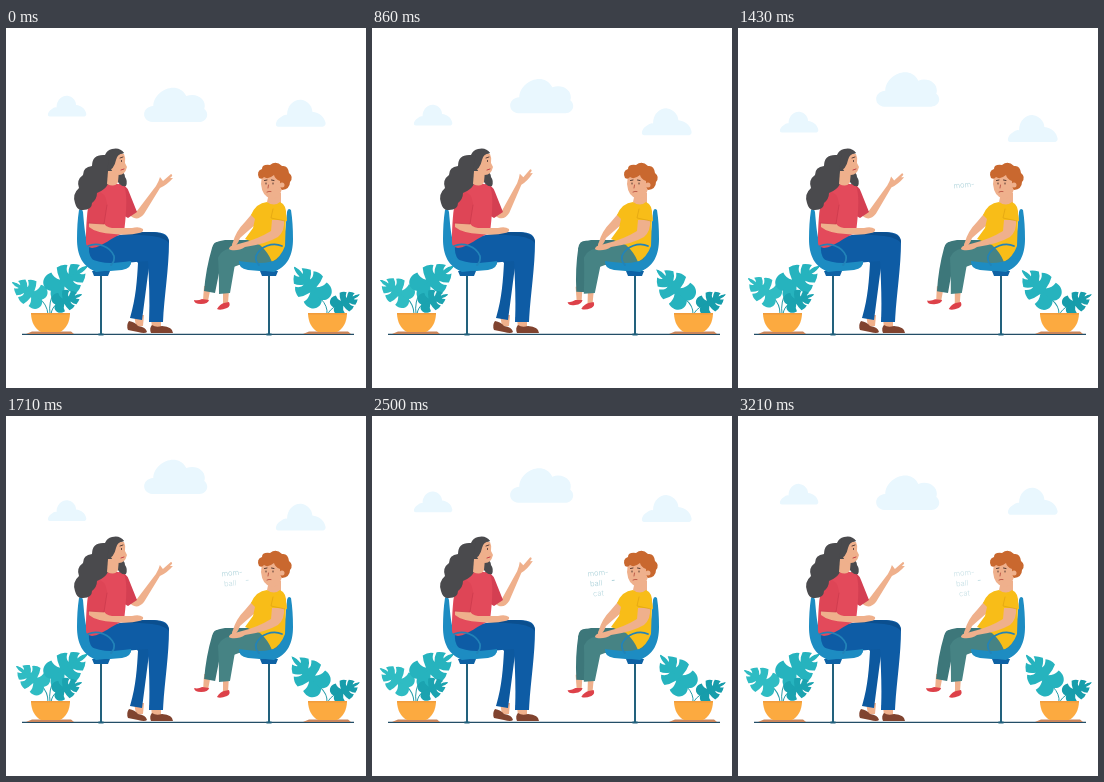
These frames come from a looping animation (360 px wide and 360 px high, 3.28 s). An HTML page:

```html
<!DOCTYPE html>
<html lang="en">
<head>
<meta charset="utf-8">
<style>
html, body { margin: 0; width: 100%; height: 100%; overflow: hidden; background: #fff; }
svg { display: block; width: 100vw; height: 100vh; }
.skin { fill: #efb08c; }
.words { font: 300 7.6px Inter, "Open Sans", sans-serif; fill: #a9d0d8; }
.line { fill: none; stroke-linecap: round; stroke-linejoin: round; }
</style>
</head>
<body>
<svg viewBox="0 0 360 360">
  <defs>
    <path id="cloud" d="M8 35C-3 34-3 20 9 19C9 4 33-8 42 9C53 5 63 13 60 22C66 27 62 35 55 35Z"/>
    <path id="lowCloud" d="M3 35C-2 35-1 27 6 23Q10 19 14 20C14 7 24 0 32 1C40 2 46 9 46 16C55 17 61 23 62 28C64 32 62 35 59 35Z"/>
    <path id="halfLeaf" d="M0 1C-9-5-3-18 9-15Q8-9 12-4Q13-11 16-16Q22-16 26-12Q21-8 22-4Q25-9 29-11Q34-8 36-5Q32-4 31-2Q37-3 42 0L40 1Z"/>
    <g id="leaf">
      <use href="#halfLeaf"/>
      <use href="#halfLeaf" transform="scale(1 -1)"/>
    </g>
    <g id="pot">
      <path fill="#c9855c" d="M26 303.5H65L68 306H20Z"/>
      <path fill="#fcaa40" d="M25 285H64C64 294 60 301 54 304H35C29 301 25 294 25 285Z"/>
      <path fill="#f19c3c" d="M25 285H64V286.5H25Z"/>
    </g>
    <g id="chairBack">
      <path class="line" stroke="#22617d" stroke-width="2" d="M95 245V306M93 306.5H97"/>
      <path fill="#1d8cc2" d="M73 182Q76 179 77 184C79 207 80 218 89 225C101 233 112 233 125 233Q126 240 116 242L92 244C76 240 71 226 71 211Q71 195 73 182Z"/>
    </g>
    <g id="chairFront">
      <path fill="#0e62a4" d="M86 243H104L102 248H88Z"/>
      <path fill="#1d8cc2" d="M83 230C96 237 110 235 125 233Q126 239 115 241L90 244Q82 240 78 231Z"/>
      <path class="line" stroke="#2283b8" stroke-width="1.8" d="M82 218C91 214 104 218 108 228Q109 233 105 237"/>
    </g>
  </defs>

  <g id="clouds" fill="#e9f7fe">
    <use href="#lowCloud"/><use href="#cloud"/><use href="#lowCloud"/>
  </g>
  <path stroke="#234e67" stroke-width="1.3" d="M16 306.3H348"/>

  <g class="line" stroke="#279ca8" stroke-width="1">
    <path d="M44 286Q42 274 49 262M45 286Q46 279 51 276M322 286Q323 282 330 278"/>
  </g>
  <g id="leftLeaf">
    <path class="line" stroke="#279ca8" stroke-width="1" d="M42 286Q41 276 33 270"/>
    <use href="#leaf" fill="#2fbcc3" transform="translate(35 271)rotate(210)scale(.8 .82)"/>
  </g>
  <use href="#leaf" fill="#26b3be" transform="translate(46 262)rotate(-34)scale(1.03 1)"/>
  <use href="#leaf" fill="#1ba3b0" transform="translate(50 276)rotate(-20)scale(.66 .66)"/>
  <g id="rightLeaf">
    <path class="line" stroke="#279ca8" stroke-width="1" d="M321 286Q322 278 315 271"/>
    <use href="#leaf" fill="#26b3be" transform="translate(315 271)rotate(230)scale(1 1)"/>
  </g>
  <use href="#leaf" fill="#179dab" transform="translate(329 279)rotate(-27)scale(.66 .66)"/>
  <use href="#pot"/><use href="#pot" x="277"/>

  <use href="#chairBack"/>
  <use href="#chairBack" transform="matrix(-1 0 0 1 358 0)"/>

  <!-- woman -->
  <path class="skin" d="M128 287H138L137 298H130Z"/>
  <path class="skin" d="M145 290H155L155 300H146Z"/>
  <path fill="#0d599f" d="M122 224L146 222L142 246L136 292L124 290C130 270 131 252 132 235Z"/>
  <path fill="#0e5ca5" d="M83 219C96 208 128 203 148 204Q163 204 163 214C163 240 158 270 157 294H143C144 272 143 252 142 233C124 234 105 238 90 235Q82 229 83 219Z"/>
  <path fill="#0b4f8f" d="M118 207C135 203 163 201 163 215C156 207 140 207 118 207Z"/>
  <path fill="#80432f" d="M123 293Q129 294 132 298Q140 299 141 304Q139 306 132 304L122 302Q120 297 123 293ZM146 297Q150 300 156 298Q167 299 167 305H145Q143 300 146 297Z"/>
  <g id="forearm">
    <path class="skin" d="M119 182L131 183L150 158Q153 153 154 149L157 153L165 146Q168 147 164 150L167 150Q161 157 154 160L138 186Q132 193 126 189Z"/>
  </g>
  <path fill="#d43f52" d="M113 156Q120 156 123 164L131 184L122 190L108 182Z"/>
  <path fill="#e34a5b" d="M95 157Q108 153 118 158C122 166 120 190 118 205C105 209 97 219 86 220Q80 219 80 215C80 198 81 170 88 163Q91 159 95 157Z"/>
  <path class="skin" d="M83 192L97 194Q99 199 106 200L126 200Q133 198 137 201Q138 204 133 205Q123 208 108 206Q90 205 83 199Z"/>
  <path fill="#de4556" d="M88 164Q99 162 101 175L98 196L82 195C81 180 83 168 88 164Z"/>
  <path class="line" stroke="#c9384b" stroke-width=".7" d="M101 177L98 196L82 195"/>
  <path fill="#4a4a4d" d="M118 125Q114 119 106 121Q101 122 99 127Q86 126 86 138Q77 139 77 147Q70 152 73 160Q66 166 69 175Q71 183 77 182Q86 182 86 175Q91 171 91 165Q99 162 102 156L112 154Q115 159 120 158Q122 153 119 149Q119 144 113 143L109 128Z"/>
  <path class="skin" d="M102 143L113 143L112 154Q109 160 101 156Z"/>
  <path class="skin" d="M107 127Q112 125 118 126Q120 130 119 135L121 139Q119 147 113 147Q105 146 104 137Z"/>
  <path fill="#4a4a4d" d="M104 124Q112 119 118 125Q111 126 110 132Q108 142 101 143Z"/>
  <path class="line" stroke="#4b3532" stroke-width=".9" d="M114 130L117 129M115.5 132.5V133.5"/>
  <path class="line" stroke="#c64348" stroke-width="1" d="M115 142L118 141"/>
  <use href="#chairFront"/>

  <!-- child -->
  <g id="farLeg">
    <path class="skin" d="M198 258H205L202 273H197Z"/>
    <path fill="#dd4149" d="M188 272Q192 273 196 271L203 272Q202 276 195 276Q188 276 188 272Z"/>
    <path fill="#3d777a" d="M206 220Q208 212 216 214L214 240L209 265L198 263Q200 240 206 220Z"/>
  </g>
  <g id="nearLeg">
    <path class="skin" d="M217 261H223L222 276L217 277Z"/>
    <path fill="#dd4149" d="M211 281Q214 276 218 275L223 274Q225 278 221 280Q214 283 211 281Z"/>
    <path fill="#468384" d="M212 230Q214 221 224 220L229 236L224 265L213 266Q213 245 212 230Z"/>
  </g>
  <path fill="#3d777a" d="M206 221Q208 213 219 212L247 212L240 228L214 230Z"/>
  <path fill="#468384" d="M212 232Q213 222 226 220L252 211L272 214V235L233 237L222 241Z"/>
  <path class="skin" d="M250 181L239 194Q230 203 227 214Q224 219 229 219Q233 214 234 210L250 196Z"/>
  <path class="skin" d="M263 165H275V177Q268 182 261 174Z"/>
  <path fill="#f8bd18" d="M261 174Q268 179 274 174Q281 177 280 188L279 218Q275 229 266 234Q262 224 254 217L239 211L247 200L249 191L245 187Q250 175 261 174Z"/>
  <path class="skin" d="M266 192L278 192Q279 203 272 209Q260 216 239 219Q233 223 225 222Q221 221 225 218L236 215Q252 211 265 203Z"/>
  <path fill="#f8bd18" d="M269 179Q280 176 281 193L265 190Z"/>
  <path class="line" stroke="#dfa312" stroke-width=".7" d="M267 181L265 190L279 193"/>
  <path class="skin" d="M256 147Q262 142 274 146L277 154Q276 170 266 171Q256 169 255 156Z"/>
  <path fill="#c9682f" d="M253 150Q250 143 256 141Q256 136 264 137Q270 132 276 138Q282 137 283 145Q288 149 284 154Q284 161 276 162Q274 160 274 153Q269 151 268 147Q262 152 258 149Q256 152 253 150Z"/>
  <circle class="skin" cx="276" cy="157" r="2.5"/>
  <path class="line" stroke="#513730" stroke-width="1" d="M260 155V156M267 155V156M258.5 152.5L261 152M265.5 152L268 152.5"/>
  <path class="line" stroke="#ba5443" stroke-width=".9" d="M261 164Q263 163 265 163.5M262.5 157L262 160"/>
  <use href="#chairFront" transform="matrix(-1 0 0 1 358 0)"/>

  <g class="words" transform="rotate(-6 226 168)">
    <text x="216.5" y="159.5">mom-</text>
    <text x="218" y="169.8">ball</text>
    <text x="220" y="180">cat</text>
    <path class="line" stroke="#a9d0d8" stroke-width=".9" d="M240.5 166H242.5"/>
  </g>
</svg>
<script>
const LOOP = 3280;
const $ = id => document.getElementById(id);
const clouds = [...$('clouds').children];
const words = [...document.querySelector('.words').children];
const wordStart = [1080, 1500, 2250, 1560];
const clamp = v => Math.max(0, Math.min(1, v));
const set = (el, value) => el.setAttribute('transform', value);
const turn = (id, angle, x, y) => set($(id), `rotate(${angle} ${x} ${y})`);
const cloudAt = (i, x, y, size) => set(clouds[i], `translate(${x} ${y}) scale(${size})`);

function draw(now) {
  const t = now % LOOP;
  const slow = Math.cos(2 * Math.PI * t / LOOP);
  const swing = (1 - Math.cos(4 * Math.PI * t / LOOP)) / 2;

  cloudAt(0, 42, 75.5 - 8.3 * slow, .61);
  cloudAt(1, 138.3, 51 + 8 * slow, 1);
  cloudAt(2, 270, 79 - 8 * slow, .79);

  turn('leftLeaf', 3.5 * (1 - slow), 42, 286);
  turn('rightLeaf', -6 * Math.sin(Math.PI * clamp((t - 200) / 2000)) ** 2, 322, 286);
  turn('forearm', -8.4 * swing, 129, 190);
  turn('farLeg', -8 * swing, 207, 218);
  turn('nearLeg', 1.8 * swing, 220, 228);

  const fade = 1 - .4 * clamp((t - 2900) / 380);
  words.forEach((w, i) => w.style.opacity = clamp((t - wordStart[i]) / 300) * fade);
}

const start = performance.now();
function tick() {
  draw(performance.now() - start);
  requestAnimationFrame(tick);
}
tick();
</script>
</body>
</html>
```
